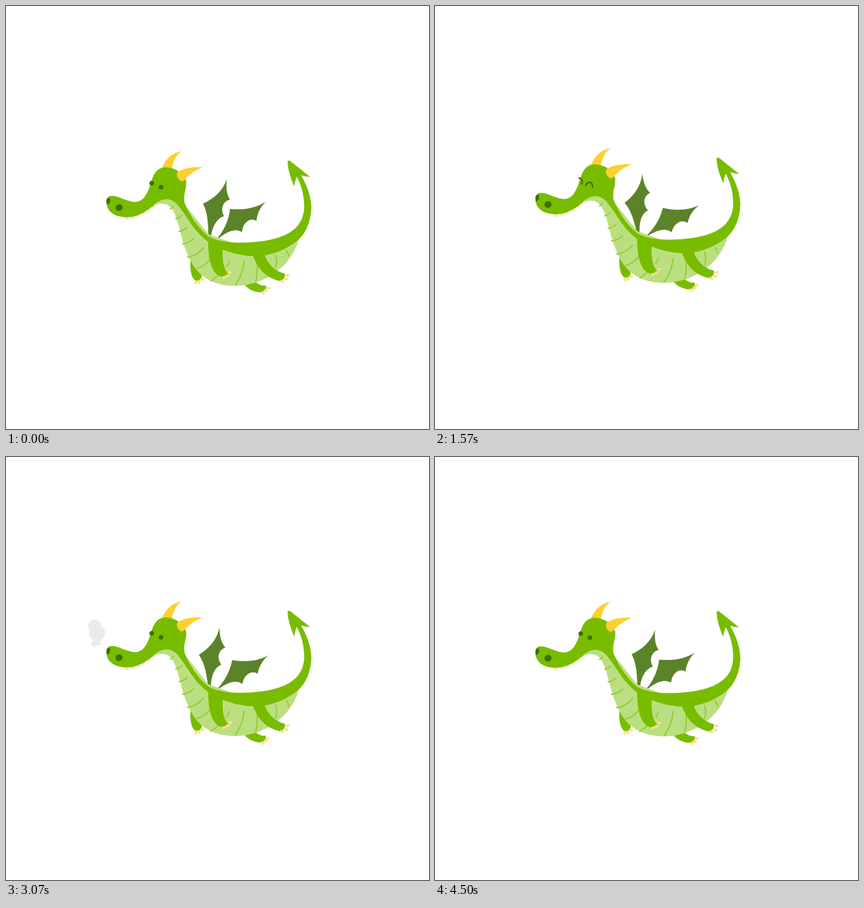
Animation of 640 by 640 pixels, one loop 4570 ms. Source, as an HTML page:

```html
<!DOCTYPE html>
<html lang="en">
<head>
<meta charset="utf-8">
<title>Flying dragon</title>
<style>
  html, body { margin: 0; width: 100%; height: 100%; overflow: hidden; background: #fff; }
  svg { display: block; width: 100vw; height: 100vh; }
  .skin { fill: #78bc00; }
  .wing { fill: #5b832a; }
  .horn { fill: #fdd02f; }
  .claw { fill: #fde08a; }
  .dark { fill: #3f7000; }
  .line { fill: none; stroke-linecap: round; }
</style>
</head>
<body>
<svg viewBox="0 0 640 640">
  <defs>
    <path id="shape" d="M152 294C153 288 158 286.500 164 287.500C176 290 186 297 197 296.500C208 295 212 286 216 277C221 264 223 244 242 244C257 244.500 269 254 272.500 265C274 275 268 284 270 297C276 314 291 337 307 349C322 357 340 358 358 358C394 357 424 351 440 334C450 323 452 309 451 298C450 282 446 270 440 258Q437 265 436 273C431 261 427 250 426 236Q426.500 232.500 430 234.500L460 258.500Q452 258 446.500 256C456 273 462 289 462 306C461 328 453 344 442 354C424 369 399 379 375 378.500C350 378 324 369 306 357C286 343 277 323 263 305C252 289 236 288 222 303C210 312 200 320 179 319.500C160 318 151 308 152 294Z"/>
    <clipPath id="inside"><use href="#shape"/></clipPath>
  </defs>
  <g id="dragon">
    <g id="smoke" fill="#ebebeb">
      <circle cx="-3.500" cy="-11.500" r="10"/>
      <circle cx="5.500" cy="-2" r="8"/>
      <circle cx="-4" cy="1" r="8"/>
      <path d="M-8 5Q-7 10-4 10Q-11 14-8 18Q-4 21 1 18Q5 17 9 16Q5 15 5 12Q8 8 11 4L7-5Z"/>
    </g>
    <path class="wing" id="farWing" d="M306 352C306 333 306 314 298 299C314 292 328 280 334 262C333 273 333 284 339 293Q329 295 327 306Q327 314 330 318Q314 323 310 349Z"/>
    <path class="wing" id="nearWing" d="M316 356C328 343 337 326 339 307C360 309 378 306 393 296C385 304 380 314 379 325Q374 322 368 324Q358 329 357 342Q343 333 319 354Z"/>
    <path class="skin" d="M279 385C278 400 281 416 290 416Q297 414 296 407C290 402 286 394 284 386ZM361 422C368 430 380 435 390 432.500Q395 428 393 423C386 424 380 420 374 415Z"/>
    <path fill="#bbdf80" d="M222 303C232 297 245 297 252 308C262 326 264 351 274 374C287 409 313 423.500 347 423.500C388 423 432 397 443 352L375 370L306 345L270 300L240 288Z"/>
    <path class="line" stroke="#96cb3b" stroke-width="2" d="M249 307Q252 306 253 303M257 322Q262 321 266 317M262 341Q269 340 274 335M267 360Q277 359 284 352M275 380Q289 378 299 366M289 397Q300 394 308 384M310 416Q318 411 323 406M334 394Q337 390 338 386M347 422Q358 407 360.500 386M378 417Q381 404 380 388M408 396Q411 388 408 377M428 378Q427 374 424 370"/>
    <path class="claw" d="M179 319L186 317.500L183 325ZM188 318L195 316L192 323ZM197 316L203 313L200.500 319.500ZM205 312L211 308.500L209 315.500ZM213 307L219 303L217 310ZM220 303L225 299L224 305Z"/>
    <path class="horn" d="M235 248C240 233 250 222 265 220C256 227 252 237 251 248Z"/>
    <use class="skin" href="#shape"/>
    <path class="horn" d="M260 251C270 245 284 243 298 244C286 248 277 255 269 264Q266 267 262 263Q256 256 260 251Z"/>
    <g id="claws" class="claw"></g>
    <path class="skin" d="M306 352C305 382 311 402 322 408Q331 413 336 405C328 397 327 382 328 361ZM372 374C381 399 394 412 416 416.500Q423 412 422 405C406 401 396 390 391 376Z"/>
    <g class="dark" clip-path="url(#inside)">
      <ellipse cx="154.500" cy="295" rx="3" ry="5" transform="rotate(15 154.500 295)"/>
      <ellipse cx="171" cy="305" rx="5.400" ry="5" transform="rotate(-30 171 305)"/>
    </g>
    <g id="openEyes" class="dark">
      <circle cx="220.500" cy="268" r="3.500"/>
      <circle cx="234.500" cy="274" r="3.500"/>
    </g>
    <path id="happyEyes" class="line" stroke="#3f7000" stroke-width="2.200" d="M218 265Q225 266 222 274M228 276Q230 271 234.500 271.500Q239 273 238.500 279"/>
  </g>
</svg>
<script>
const LOOP = 4570, STEPS = 64, FLAPS = 6, SMOKE_EVERY = 2860;
const $ = id => document.getElementById(id);

// Knots over one flap: [phase, value]
const lift = [[0, 0], [.031, -1.3], [.156, -15], [.3, -27.5], [.41, -30.6], [.5, -28],
  [.531, -25.3], [.84, -5.7], [.906, -.7], [.96, .4]];
const swing = [[0, 0], [.031, 7], [.156, 28], [.29, 31.5], [.5, 25.7],
  [.531, 21.5], [.84, 4.5], [.906, .6], [.95, -.6]];

// Smooth periodic curve through the knots
function curve(knots, phase) {
  const n = knots.length;
  const at = i => {
    const turn = Math.floor(i / n), [p, v] = knots[i - turn * n];
    return [p + turn, v];
  };
  let i = n - 1;
  while (knots[i][0] > phase) i--;
  const [a, b, c, d] = [i - 1, i, i + 1, i + 2].map(at);
  const w = c[0] - b[0], u = (phase - b[0]) / w;
  const m0 = (c[1] - a[1]) / (c[0] - a[0]) * w;
  const m1 = (d[1] - b[1]) / (d[0] - b[0]) * w;
  const rise = c[1] - b[1];
  return b[1] + m0 * u + (3 * rise - 2 * m0 - m1) * u * u + (m0 + m1 - 2 * rise) * u ** 3;
}

// Toes: x, y, angle
$('claws').innerHTML = [
  [287, 418, 75], [292, 417.5, 60], [296.5, 414, 20],
  [389, 434, 60], [393, 431, 25], [395.5, 427, -10],
  [330, 410.5, -20], [335.500, 408, -10], [339, 403, -5],
  [418, 416.5, 35], [424, 413.5, 10], [426, 407.5, 0]
].map(([x, y, r]) => `<ellipse cx="${x}" cy="${y}" rx="3.200" ry="2" transform="rotate(${r} ${x} ${y})"/>`).join('');
$('dragon').append($('claws'));

function drawSmoke(t) {
  const k = (t - 210) / 430;
  const size = k < 0 ? .4 + .6 * t / 210 : 1 - .28 * k;
  const alpha = k < 0 ? t / 150 : 1 - k * .55;
  $('smoke').setAttribute('opacity', t > 800 ? 0 : Math.max(0, Math.min(1, alpha)));
  $('smoke').setAttribute('transform',
    `translate(${137.5 - 6 * k} ${268.5 - 9 * k}) scale(${Math.max(.1, size)})`);
}

function draw() {
  const step = Math.floor((performance.now() % LOOP + 5) / LOOP * STEPS) % STEPS;
  const t = step * LOOP / STEPS;
  const phase = step * FLAPS / STEPS % 1;
  const flap = curve(swing, phase);
  const happy = t > 1480 && t < 2400;
  $('dragon').setAttribute('transform', `translate(0 ${curve(lift, phase)})`);
  $('farWing').setAttribute('transform', `rotate(${-flap} 307 350)`);
  $('nearWing').setAttribute('transform', `rotate(${flap * .56} 318 354)`);
  $('openEyes').style.display = happy ? 'none' : '';
  $('happyEyes').style.display = happy ? '' : 'none';
  drawSmoke(t % SMOKE_EVERY);
  requestAnimationFrame(draw);
}
draw();
</script>
</body>
</html>
```
